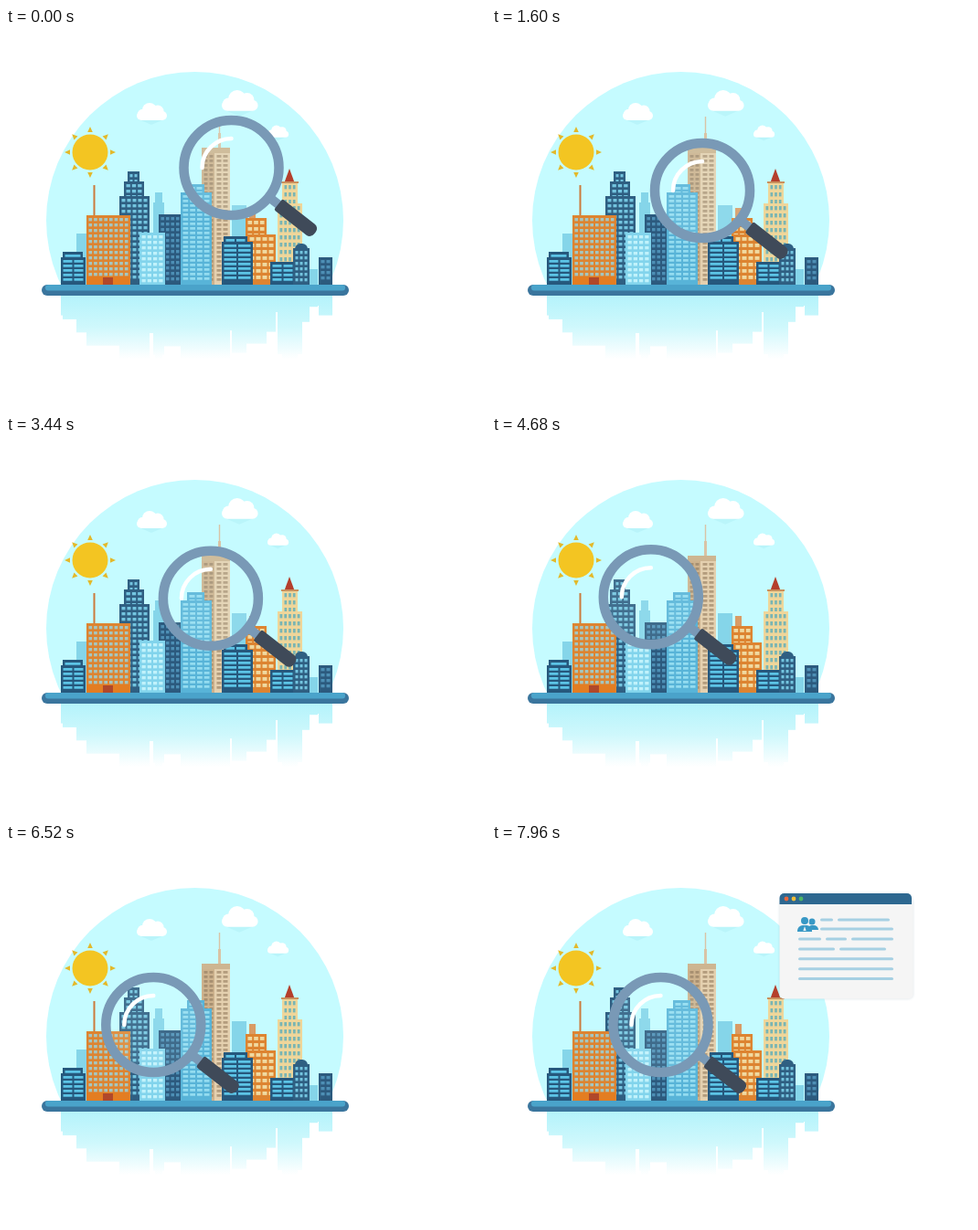
An HTML page with a canvas for the animation above (8000 ms loop, 525 px wide and 416 px high).

```html
<!DOCTYPE html>
<html lang="en">
<head>
<meta charset="utf-8">
<title>City search</title>
<style>
html, body { margin: 0; width: 100%; height: 100%; overflow: hidden; background: #fff; }
canvas { display: block; }
</style>
</head>
<body>
<canvas id="stage" width="525" height="416"></canvas>
<script>
const LOOP = 8000;
const GROUND = 281;
const WATER = 293;
const ctx = document.getElementById('stage').getContext('2d');

function rect(x, y, w, h, color) {
  ctx.fillStyle = color;
  ctx.fillRect(x, y, w, h);
}

function disc(x, y, r, color) {
  ctx.fillStyle = color;
  ctx.beginPath();
  ctx.arc(x, y, r, 0, Math.PI * 2);
  ctx.fill();
}

function triangle(x, base, halfWidth, height, color) {
  ctx.fillStyle = color;
  ctx.beginPath();
  ctx.moveTo(x - halfWidth, base);
  ctx.lineTo(x, base - height);
  ctx.lineTo(x + halfWidth, base);
  ctx.fill();
}

function rounded(x, y, w, h, radii, color) {
  ctx.fillStyle = color;
  ctx.beginPath();
  ctx.roundRect(x, y, w, h, radii);
  ctx.fill();
}

function arc(r, from, to, width, color, cap = 'butt') {
  ctx.strokeStyle = color;
  ctx.lineWidth = width;
  ctx.lineCap = cap;
  ctx.beginPath();
  ctx.arc(0, 0, r, from, to);
  ctx.stroke();
}

function at(x, y, draw) {
  ctx.save();
  ctx.translate(x, y);
  draw();
  ctx.restore();
}

function drawSun() {
  for (let i = 0; i < 8; i++) {
    triangle(0, -22, 2.8, 6, '#e3b92a');
    ctx.rotate(Math.PI / 4);
  }
  disc(0, 0, 19.5, '#f3c522');
}

function drawCloud(scale) {
  ctx.scale(scale, scale);
  triangle(16, 18, 14, -6, 'rgba(120,205,220,.15)');
  rounded(0, 9, 33, 10, 5, '#fff');
  disc(14, 8, 8, '#fff');
  disc(23, 9, 6.5, '#fff');
  disc(6, 12, 5, '#fff');
}

function drawSky() {
  ctx.save();
  ctx.beginPath();
  ctx.rect(0, 0, 525, GROUND);
  ctx.clip();
  disc(206.5, 210.5, 162.5, '#c5fbff');
  ctx.restore();
  at(92, 136, drawSun);
  at(143, 82, () => drawCloud(1));
  at(236, 68, () => drawCloud(1.2));
  at(286, 106.5, () => drawCloud(0.7));
}

// Facades: window pitch across and down; windows fill the pitch less a mullion.
const HAZE = { wall: '#85d5e9' };
const NAVY = { wall: '#2f5f82', glass: '#73c4df', across: 6, down: 6 };
const STRIPED = { wall: '#26587d', glass: '#5cc4e6', across: 13, down: 5 };
const DUSK = { wall: '#2c5a7e', glass: '#4d8fb5', across: 5, down: 6 };
const BLUE = { wall: '#58b4d8', glass: '#93dcf0', across: 8, down: 5 };
const ICE = { wall: '#82d4ec', glass: '#c0f2fb', across: 7, down: 6 };
const BRICK = { wall: '#dd8431', glass: '#a5c6c0', across: 6, down: 6 };
const AMBER = { wall: '#dd8431', glass: '#f0d9a0', across: 7, down: 7 };
const TAN = { wall: '#cdb28d', glass: '#a78f70', across: 7, down: 5 };
const SAND = { wall: '#e4d0af', glass: '#b39c7d', across: 8, down: 5 };
const CREAM = { wall: '#efd69a', glass: '#79b5b3', across: 5, down: 8 };

function tower(left, width, height, { wall, glass, across, down }) {
  const top = GROUND - height;
  rect(left, top, width, height, wall);
  if (!glass) return;
  const columns = Math.max(1, Math.round((width - 3) / across));
  const pitch = (width - 3) / columns;
  const pane = down * 0.55;
  for (let y = top + 3; y + pane < GROUND - 2; y += down)
    for (let i = 0; i < columns; i++)
      rect(left + 2.5 + i * pitch, y, pitch - 2, pane, glass);
}

// Runs through the skyline from back to front with any way of drawing a block.
function skyline(block) {
  block(77, 12, 56, HAZE);
  block(161, 12, 90, HAZE);
  block(163, 8, 101, HAZE);
  block(247, 16, 87, HAZE);
  block(331, 10, 17, HAZE);
  block(133, 13, 124, NAVY);
  block(129, 22, 113, NAVY);
  block(124, 33, 97, NAVY);
  block(214, 15, 150, TAN);
  block(228, 17, 150, SAND);
  block(88, 48, 76, BRICK);
  block(62, 22, 36, STRIPED);
  block(60, 27, 30, STRIPED);
  block(167, 25, 77, DUSK);
  block(198, 19, 110, BLUE);
  block(191, 34, 101, BLUE);
  block(146, 28, 57, ICE);
  block(262, 23, 73, AMBER);
  block(264, 31, 55, AMBER);
  block(238, 26, 53, STRIPED);
  block(236, 34, 47, STRIPED);
  block(302, 17, 112, CREAM);
  block(297, 27, 89, CREAM);
  block(289, 27, 25, STRIPED);
  block(314, 18, 40, NAVY);
  block(342, 15, 30, DUSK);
}

function drawRoofs() {
  rect(95.5, 172, 2, 33, '#cc7a3c');
  rect(88, 272, 47, 9, '#e37d22');
  rect(106, 273, 11, 8, '#b0482a');
  rect(232.8, 97, 1.4, 34, '#d9c3a6');
  rect(232, 115, 3, 16, '#d9c3a6');
  rect(214, 131, 31, 6, '#cdb591');
  rect(266, 197, 7, 11, '#d99b65');
  triangle(310, 169, 5.5, 15, '#b43f2c');
  rect(301, 168, 19, 2, '#c9905e');
  rounded(316, 236, 14, 8, [6, 6, 0, 0], NAVY.wall);
}

function drawBase() {
  const fade = ctx.createLinearGradient(0, WATER, 0, 362);
  fade.addColorStop(0, '#b4f3fb');
  fade.addColorStop(0.5, '#cff8fc');
  fade.addColorStop(1, '#fff');
  rect(60, WATER, 296, 11, fade);
  skyline((left, width, height) => rect(left, WATER, width, Math.min(69, height * 0.72), fade));
  rounded(39, GROUND, 336, 12, 6, '#3a759d');
  rounded(43, GROUND, 328, 6.5, 3, '#4aa3ca');
}

const CARD_LEFT = 21, CARD_RIGHT = 125, INK = '#a6d0e3', ACCENT = '#3898c5';
const FULL = [CARD_RIGHT], THREE = [46, 74, CARD_RIGHT], TWO = [61, 117];

// Draws words on one row; each ends at a given x and the next follows after a gap.
function drawRow(left, y, ends) {
  for (const end of ends) {
    rounded(left, y - 1.5, end - left, 3, 1.5, INK);
    left = end + 5;
  }
}

function drawCompany() {
  disc(30, 35, 10, ACCENT);
  ctx.fillStyle = '#fff';
  ctx.font = '500 12px "Noto Sans CJK SC", "Noto Sans CJK", sans-serif';
  ctx.textAlign = 'center';
  ctx.textBaseline = 'middle';
  ctx.fillText('企', 30, 35.5);
}

function drawPeople() {
  disc(36, 31, 3.5, ACCENT);
  rounded(31, 35, 12, 5, [5, 5, 0, 0], ACCENT);
  disc(28, 30, 4.8, '#f5f5f5');
  disc(28, 30, 4, ACCENT);
  rounded(20, 35, 16, 7, [6, 6, 0, 0], ACCENT);
  triangle(28, 41, 1.6, 5, '#f5f5f5');
}

const CARDS = [
  { x: 347, y: 78, from: 1850, to: 3050, icon: drawCompany, rows: [FULL, FULL, THREE, TWO, FULL] },
  { x: 314, y: 54, from: 6950, to: 9000, icon: drawPeople, rows: [THREE, TWO, FULL, FULL, FULL] }
];

function drawCard({ x, y, from, to, icon, rows }, time) {
  const alpha = Math.min(1, (time - from) / 300, (to - time) / 300);
  if (alpha <= 0) return;
  at(x, y, () => {
    ctx.globalAlpha = alpha;
    ctx.shadowColor = 'rgba(80,120,140,.22)';
    ctx.shadowBlur = 3;
    rounded(0.5, 5, 146, 110.5, 5, '#f5f5f5');
    ctx.shadowColor = 'transparent';
    rounded(0.5, 0, 144.5, 12, [5, 5, 0, 0], '#2e6890');
    ['#e9673d', '#f1bd37', '#4eb563'].forEach((color, i) => disc(8 + i * 8, 6, 2.4, color));
    icon();
    drawRow(45, 29, [59, 121]);
    drawRow(45, 39, FULL);
    rows.forEach((ends, i) => drawRow(CARD_LEFT, 50 + i * 10.9, ends));
  });
}

// The lens drops, drifts aside, sweeps left, sinks and returns; the moves add up.
const MOVES = [
  { from: 0, to: 920, dx: 0, dy: 25 },
  { from: 920, to: 1750, dx: -18, dy: 0 },
  { from: 3050, to: 5900, dx: -90, dy: -3 },
  { from: 5400, to: 6500, dx: 0, dy: 23 },
  { from: 5900, to: 7150, dx: 46, dy: 0 }
];

function lensAt(time) {
  const lens = { x: 246.5, y: 153 };
  for (const { from, to, dx, dy } of MOVES) {
    const u = Math.min(1, Math.max(0, (time - from) / (to - from)));
    const eased = u * u * (3 - 2 * u);
    lens.x += dx * eased;
    lens.y += dy * eased;
  }
  return lens;
}

function drawLens() {
  const steel = '#7999b6';
  disc(0, 0, 48, 'rgba(220,250,255,.1)');
  ctx.save();
  ctx.rotate(38 * Math.PI / 180);
  rect(54, -5, 14, 10, steel);
  rounded(65, -7.5, 51, 15, [2, 6, 6, 2], '#3f4a59');
  ctx.restore();
  arc(52, 0, Math.PI * 2, 10.5, steel);
  arc(32, Math.PI, Math.PI * 1.5, 4.5, '#fff', 'round');
}

const start = performance.now();

function render() {
  const time = (performance.now() - start) % LOOP;
  const lens = lensAt(time);
  rect(0, 0, 525, 416, '#fff');
  drawSky();
  skyline(tower);
  drawRoofs();
  drawBase();
  at(lens.x, lens.y, drawLens);
  CARDS.forEach(card => drawCard(card, time));
  requestAnimationFrame(render);
}
render();
</script>
</body>
</html>
```
